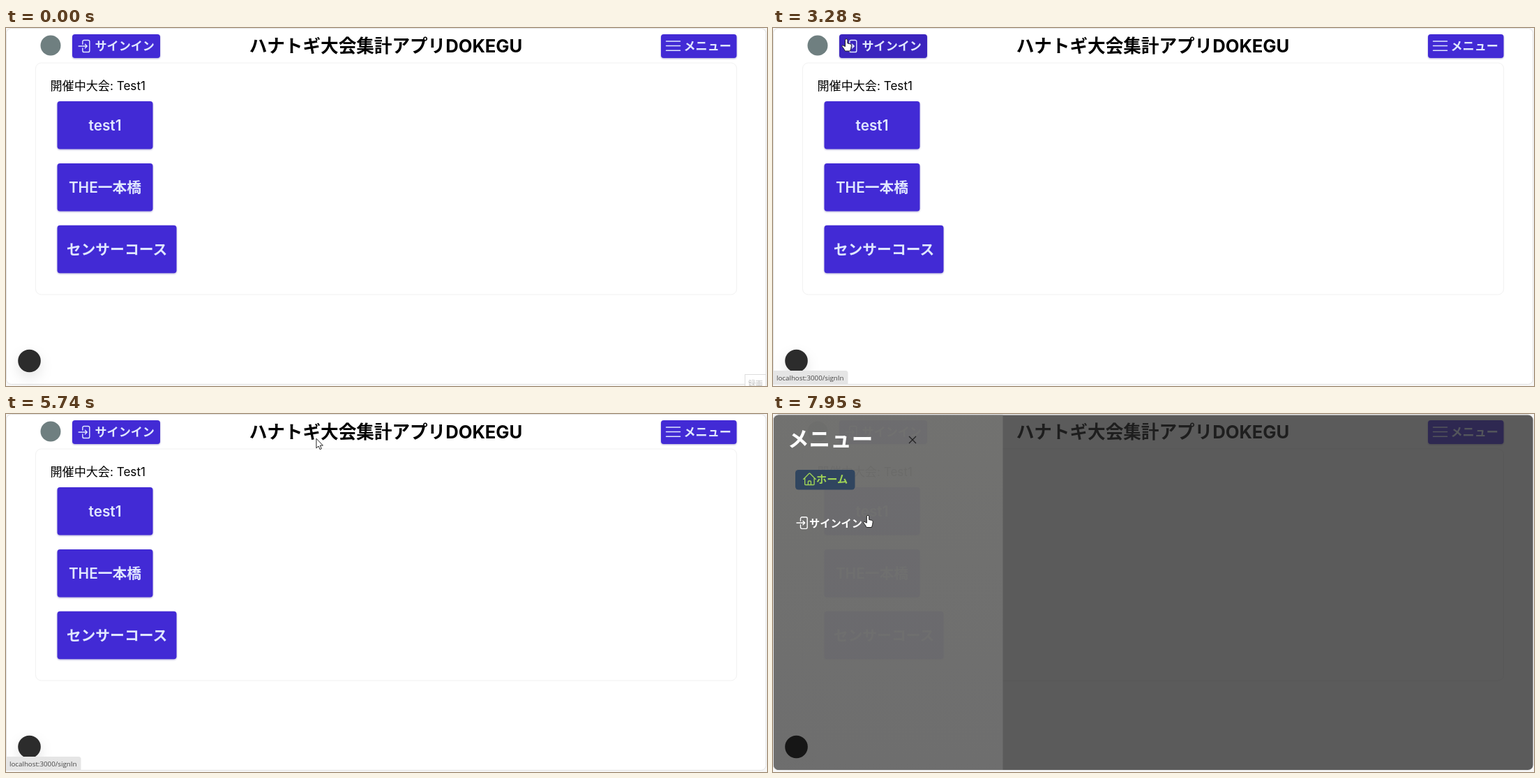
Animation, 1091 px wide and 513 px high, one loop 8 s. Source, as an HTML page:

```html
<!DOCTYPE html>
<html lang="ja">
<head>
<meta charset="utf-8">
<title>大会集計アプリ</title>
<style>
html, body { margin: 0; width: 100%; height: 100%; overflow: hidden; background: #f7f7f7; }
svg { display: block; width: 100%; height: 100%; font-family: Inter, "Noto Sans CJK JP", "Noto Sans CJK", sans-serif; }
.btn rect { fill: #422ad5; filter: drop-shadow(0 1.5px 1px rgba(50, 35, 150, .4)); }
.btn.hover rect { fill: #3b24be; }
.btn text { fill: #e0e7ff; font-weight: 600; font-size: 17.1px; }
.btn.big text { font-size: 20.8px; text-anchor: middle; }
.line { fill: none; stroke: #e0e7ff; stroke-width: 1.5; stroke-linecap: round; stroke-linejoin: round; }
.item { font-size: 15.2px; font-weight: 600; fill: #fff; }
.home { fill: #9fd356; }
.line.home { fill: none; stroke: #9fd356; }
.badge { fill: #2c2c2c; filter: drop-shadow(0 8px 9px rgba(0, 0, 0, .1)); }
.pointer { fill: #fff; stroke: #222; stroke-linejoin: round; }
</style>
</head>
<body>
<svg viewBox="0 0 1091 513">
  <defs>
    <path id="door" d="M8.25 9V5.25A2.25 2.25 0 0 1 10.5 3h6a2.25 2.25 0 0 1 2.25 2.25v13.5A2.25 2.25 0 0 1 16.5 21h-6a2.25 2.25 0 0 1-2.25-2.25V15M12 9l3 3-3 3m3-3H2.25"/>
    <linearGradient id="panel" x2="0" y2="1">
      <stop stop-color="#747472"/><stop offset="1" stop-color="#707070"/>
    </linearGradient>
    <clipPath id="window"><rect x="1" y="1.5" width="1088.5" height="508.5" rx="7"/></clipPath>
  </defs>

  <rect x=".5" y=".5" width="1089" height="510" rx="7" fill="#fff" stroke="#e2e2e2"/>
  <circle cx="64" cy="25" r="14.5" fill="#6f7f80"/>
  <text x="544.5" y="35" text-anchor="middle" font-size="25.6" font-weight="700">ハナトギ大会集計アプリDOKEGU</text>

  <g class="btn" id="signIn">
    <rect x="95" y="9" width="126" height="34" rx="4"/>
    <use href="#door" class="line" transform="translate(102 14.6) scale(.95)"/>
    <text x="127.5" y="32">サインイン</text>
  </g>
  <g class="btn" id="menu">
    <rect x="939" y="9" width="108.5" height="34" rx="4"/>
    <path class="line" d="M946.5 19h20m-20 6.6h20m-20 6.6h20"/>
    <text x="971.5" y="32">メニュー</text>
  </g>

  <rect x="42.5" y="50" width="1005" height="332" rx="8" fill="none" stroke="#f1f1f1"/>
  <text x="63.5" y="89" font-size="17.1">開催中大会: Test1</text>
  <g id="courses"></g>

  <circle class="badge" cx="33.5" cy="477" r="16.3"/>

  <g id="status">
    <path d="M0 491H104q3.5 0 3.5 3.5V511H0z" fill="#e5e5e5"/>
    <text x="5" y="505" font-size="9.75" fill="#444" style="font-family: 'Open Sans', sans-serif">localhost:3000/signIn</text>
  </g>

  <g id="drawer">
    <g clip-path="url(#window)">
      <rect width="1091" height="513" fill="#282828" opacity=".76"/>
      <rect x="1" y="1" width="328.5" height="510" fill="url(#panel)" opacity=".9"/>
    </g>
    <circle cx="33.5" cy="477" r="16.3" fill="#161616"/>
    <text x="21" y="47" font-size="30.6" font-weight="700" fill="#fff">メニュー</text>
    <path d="M195 32l10 10m0-10l-10 10" stroke="#222" stroke-width="1.2"/>
    <rect x="32" y="80" width="85.5" height="28.5" rx="4.5" fill="#30455f"/>
    <path class="line home" transform="translate(41.6 82.6) scale(.9)" d="M2.25 12l9-9q.75-.6 1.5 0l9 9M4.5 9.75V19.9q0 1.1 1.1 1.1H9.75V16q0-1.1 1.1-1.1h2.3q1.1 0 1.1 1.1v5h4.1q1.1 0 1.1-1.1V9.75M8.25 21h8.25"/>
    <text class="item home" x="62" y="99">ホーム</text>
    <use href="#door" class="line" style="stroke: #fff" transform="translate(31.9 145) scale(.92)"/>
    <text class="item" x="52" y="161.5">サインイン</text>
  </g>

  <g id="record">
    <rect x="1059.5" y="496.5" width="30" height="20" fill="#fff" stroke="#ddd"/>
    <text x="1064" y="513" font-size="10.5" fill="#c4c4c4">録画</text>
  </g>

  <circle id="click" cx="961" cy="34.5" r="10" fill="#cfc02a" opacity=".65"/>
  <g id="cursor" class="pointer">
    <path id="arrow" d="M.5.5V14.2L3.6 11.3 5.7 16 7.9 15 5.9 10.4H10z"/>
    <path id="hand" d="M-1.7 1.9a1.7 1.7 0 0 1 3.4 0v4.5l4 .9q1.7.5 1.5 2.3l-.6 4.2-1.2 3.7h-7.2l-2.4-4-2-2.6q-.5-1.5 1-1.7l3.5 1.9z"/>
  </g>
</svg>
<script>
const LOOP = 8000, FPS = 15, ENTER = 880, CLICK = 6860, OPEN = 6920;
const $ = id => document.getElementById(id);

$("courses").innerHTML = ["test1", "THE一本橋", "センサーコース"].map((name, i) => {
  const width = name.length > 6 ? 171 : 137, y = 105 + 88.9 * i;
  return `<g class="btn big"><rect x="73.5" y="${y}" width="${width}" height="68.5" rx="4"/>
    <text x="${73.5 + width / 2}" y="${y + 42}">${name}</text></g>`;
}).join("");

// The pointer circles over the sign-in button, 0.42 degrees per ms
function circle(t) {
  const a = (220 + .42 * (t - 3280)) * Math.PI / 180;
  return { x: 158 + 64 * Math.cos(a), y: 24 + 15 * Math.sin(a) };
}

const at = (t, x, y) => ({ t, x, y });
const CIRCLE_FROM = 2450, CIRCLE_TO = 4930;
const stops = [
  at(ENTER, 1019, 499), at(1340, 714, 408), at(1620, 508, 320),
  { t: CIRCLE_FROM, ...circle(CIRCLE_FROM) }, { t: CIRCLE_TO, ...circle(CIRCLE_TO) },
  at(5140, 121, 22), at(5400, 121, 22),
  at(6240, 936, 54), at(6400, 1014, 22), at(6590, 961, 33), at(7250, 961, 33),
  at(7950, 136, 145)
];

function pointer(t) {
  if (t > CIRCLE_FROM && t < CIRCLE_TO) return circle(t);
  const i = stops.findIndex(s => s.t > t);
  if (i < 1) return stops.at(i);
  const a = stops[i - 1], b = stops[i], k = (t - a.t) / (b.t - a.t);
  return { x: a.x + (b.x - a.x) * k, y: a.y + (b.y - a.y) * k };
}

const show = (id, on) => { $(id).style.display = on ? "" : "none"; };

function draw(t) {
  const tick = Math.floor((t + 8) * FPS / 1000) * 1000 / FPS;
  const { x, y } = pointer(t > 7900 ? LOOP : Math.max(tick, ENTER));
  const open = t >= OPEN, entered = t >= ENTER;
  const over = (left, right) => entered && x >= left && x <= right && y >= 8 && y <= 43;
  const onSign = !open && over(95, 221), onMenu = over(939, 1047);
  const hand = open ? x < 141 : onSign || onMenu;

  $("signIn").classList.toggle("hover", onSign);
  $("menu").classList.toggle("hover", onMenu && t < OPEN + 60);
  show("status", t >= 2590 && t < 5870);
  show("drawer", open);
  show("record", t < 70);
  show("click", t >= CLICK && !open);
  show("cursor", entered);
  show("hand", hand);
  show("arrow", !hand);
  $("cursor").setAttribute("transform", `translate(${x.toFixed(1)} ${y.toFixed(1)})`);
}

const began = performance.now();
function frame() {
  draw((performance.now() - began) % LOOP);
  requestAnimationFrame(frame);
}
frame();
</script>
</body>
</html>
```
